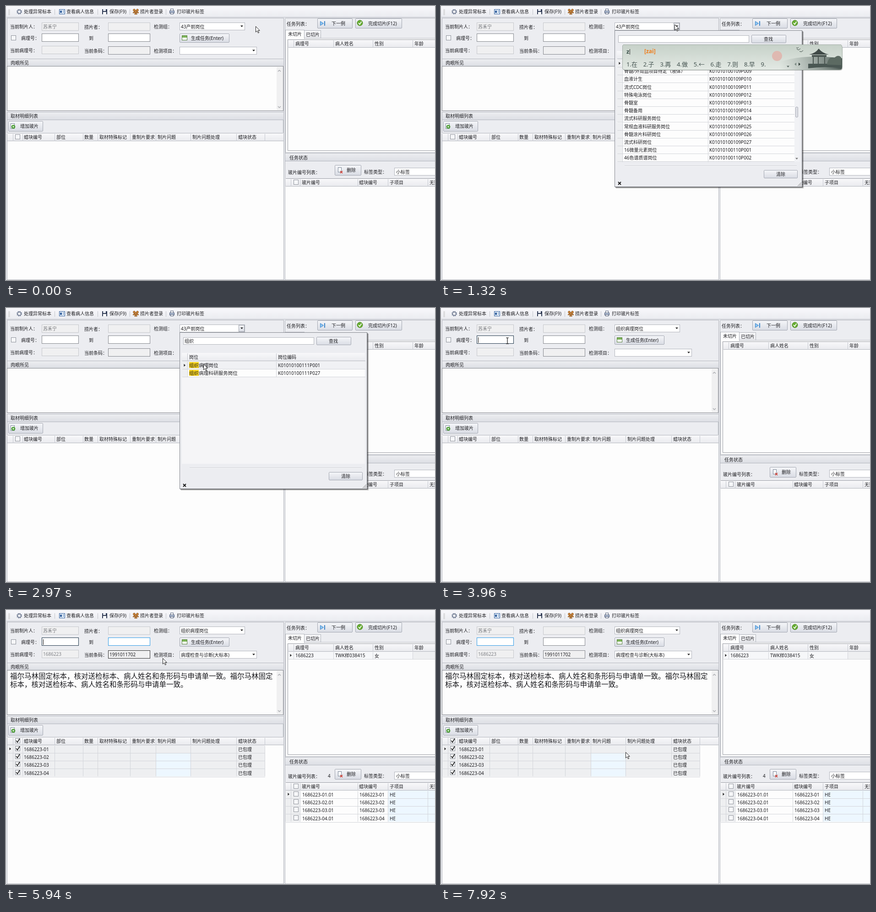
Recreate the animation shown at these times as an HTML page. Size 937 by 598 pixels, loop 8000 ms.

```html
<!DOCTYPE html>
<html lang="zh">
<head>
<meta charset="utf-8">
<style>
html, body { margin: 0; width: 100%; height: 100%; overflow: hidden; background: #ecedf1; }
svg { display: block; width: 100%; height: 100%; }
text { font-family: "Noto Sans", "Noto Sans CJK SC", "Noto Sans CJK", sans-serif; white-space: pre; }
rect, line { shape-rendering: crispEdges; }
</style>
</head>
<body>
<svg id="stage" viewBox="0 0 937 598" preserveAspectRatio="none"></svg>
<script>
const LOOP = 8000, STEP = 330;
const PANEL = '#ecedf1', WHITE = '#fdfdfd', EDGE = '#b3b6bd', GRID = '#d3d5da', DARK = '#85888e';
const HOT = '#2e9be6', SHADE = '#eeeff1', TINT = '#edf7ff';

const DEFS = `<defs>${[
  ['bar', '#f8f8fb', '#eaebf0'], ['title', '#edeef1', '#dcdee4'], ['head', '#f8f8fa', '#e9eaee'],
  ['btn', '#f5f6f9', '#d9dce4'], ['ime', '#c6d1c8', '#e3e9e4']
].map(([id, a, b]) => `<linearGradient id="${id}" x2="0" y2="1"><stop stop-color="${a}"/><stop offset="1" stop-color="${b}"/></linearGradient>`).join('')}
<linearGradient id="mist"><stop stop-color="#8c9a94" stop-opacity="0"/><stop offset="1" stop-color="#4d5a55"/></linearGradient></defs>`;

const fill = (x, y, w, h, color) => `<rect x="${x}" y="${y}" width="${w}" height="${h}" fill="${color}"/>`;
const box = (x, y, w, h, color, stroke = EDGE, r = 0) =>
  `<rect x="${x + .5}" y="${y + .5}" width="${w - 1}" height="${h - 1}" rx="${r}" fill="${color}" stroke="${stroke}"/>`;
const line = (x1, y1, x2, y2, color = GRID) =>
  `<line x1="${x1 + .5}" y1="${y1 + .5}" x2="${x2 + .5}" y2="${y2 + .5}" stroke="${color}"/>`;
const path = (d, color, stroke = 'none', width = 1) => `<path d="${d}" fill="${color}" stroke="${stroke}" stroke-width="${width}"/>`;
const dot = (x, y, r, color, stroke = 'none') => `<circle cx="${x}" cy="${y}" r="${r}" fill="${color}" stroke="${stroke}"/>`;
// y is the middle of the line of text
const text = (x, y, str, color = '#1b1b1f', size = 10, weight = 400) =>
  `<text x="${x}" y="${y + size * .37}" font-size="${size}" fill="${color}" font-weight="${weight}">${str}</text>`;
const down = (x, y, color = '#222') => path(`M${x - 3},${y - 1.5}h6l-3,3.5z`, color);
const right = (x, y) => path(`M${x - 1.5},${y - 3}v6l3.5,-3z`, '#222');
const button = (x, y, w, h, label, tx) =>
  box(x, y, w, h, 'url(#btn)', '#a3a7b1', 2) + text(tx, y + h / 2, label);
const check = (x, y, on) => box(x, y, 11, 11, '#f6f7f9', '#8f939b') +
  (on ? path(`M${x + 2},${y + 5}l3,3.5l5,-8`, 'none', '#222', 1.7) : '');
const header = (y, h, x0, x1, columns) => fill(x0, y, x1 - x0, h, 'url(#head)') +
  line(x0, y + h - 1, x1, y + h - 1, EDGE) +
  columns.map(([x, label, dx = 3]) => line(x, y, x, y + h - 1, '#c5c8cf') + text(x + dx, y + h / 2, label)).join('');
const rowY = (first, i) => first + Math.round(i * 17.2);

function toolbar() {
  const labels = [[39, '处理异常标本'], [132, '查看病人信息'], [226, '保存(F9)'], [293, '捞片者登录'], [373, '打印玻片标签']];
  let s = fill(0, 0, 937, 25, 'url(#bar)') + line(0, 24, 937, 24, '#b9bcc4') + line(6, 6, 6, 19, '#bbb') + line(8, 6, 8, 19, '#ddd');
  s += labels.map(([x, l]) => text(x, 12, l)).join('');
  s += [106, 200, 270, 349].map(x => line(x, 6, x, 18, '#c2c4ca')).join('');
  s += `<circle cx="29" cy="12.5" r="4.5" fill="none" stroke="#69758d" stroke-width="2.5" stroke-dasharray="2.2 1.3"/>` + dot(29, 12.5, 3.5, 'none', '#69758d');
  s += box(116, 7, 13, 11, '#eaf2fb', '#315f9d') + fill(118, 10, 4, 5, '#315f9d') + line(123, 10, 126, 10, '#315f9d') + line(123, 13, 126, 13, '#315f9d');
  s += fill(210, 7, 11, 11, '#303b55') + fill(212, 7, 6, 4, '#e4e8ef') + fill(212, 13, 7, 5, '#fff');
  s += [[280, 9], [287, 9], [283.5, 12]].map(([x, y]) => dot(x, y, 2.3, '#d58a3a', '#8b531b') + path(`M${x - 3},${y + 6}q3,-5 6,0z`, '#d58a3a', '#8b531b')).join('');
  return s + box(359, 6, 7, 6, '#fff', '#56627b') + box(357, 10, 11, 6, '#aebbd2', '#56627b') + box(359, 14, 7, 4, '#fff', '#56627b');
}

function form(t) {
  const loaded = t >= 5940, picked = t >= 3300;
  let s = box(2, 26, 605, 90, PANEL);
  const labels = [[9, 45, '当前制片人：'], [171, 46, '捞片者：'], [323, 45, '检测组：'], [33, 70, '病理号：'], [181, 70, '到'],
    [9, 97, '当前病理号：'], [171, 98, '当前条码：'], [323, 98, '检测项目：']];
  s += labels.map(([x, y, l]) => text(x, y, l)).join('') + check(11, 64);
  const off = '#f0f0f1', offEdge = '#c6c8cc';
  s += box(78, 36, 81, 18, off, offEdge) + text(81, 45, '苏禾宁', '#6c6e73');
  s += box(223, 36, 92, 18, off, offEdge) + box(78, 87, 81, 18, off, offEdge);

  const typing = t >= 4290 && t < 4620, second = t >= 4620 && t < 6270;
  const firstEdge = typing || t >= 6270 ? HOT : t >= 3960 && !(second && !loaded) ? '#22394d' : DARK;
  s += box(78, 60, 81, 18, '#fff', firstEdge);
  s += box(223, 60, 92, 18, '#fff', t >= 4950 && second ? HOT : second ? '#5d87a5' : DARK);
  s += box(223, 88, 92, 18, off, t >= 3630 && t < 3960 ? '#6c9cba' : loaded && t < 6270 ? '#333' : DARK);
  if (t >= 4290 && !loaded) s += text(81, 69, typing ? '1686' : '1686223');
  if (t >= 4950 && !loaded) s += text(226, 69, '1686223');
  const caret = t >= 3960 && t < 4290 || loaded && t < 6600 || t >= 7260 && t < 7920;
  if (caret) s += line(81, 63, 81, 75, '#111');

  s += box(379, 36, 143, 17, '#fff');
  const focused = picked && t < 3960;
  if (focused) s += fill(381, 37, 126, 14, '#3399ff');
  s += text(382, 45, picked ? '组织病理岗位' : '43产前岗位', focused ? '#fff' : undefined);
  if (t >= 330 && !picked) s += box(508, 37, 13, 15, 'url(#btn)', '#9da1aa');
  s += down(515, 44) + box(379, 89, 169, 17, '#fff') + down(541, 97);
  s += button(379, 60, 109, 20, '生成任务(Enter)', 404) + box(384, 64, 12, 11, '#fff', '#56803d') + fill(385, 65, 10, 4, '#7eb45a');
  if (loaded) s += text(81, 96, '1686223', '#808287') + text(226, 97, '1991011702') + text(382, 98, '病理检查与诊断(大标本)');
  return s;
}

function leftPanel(t) {
  const loaded = t >= 5940;
  let s = box(2, 115, 605, 17, 'url(#title)') + text(10, 124, '肉眼所见');
  s += box(2, 131, 604, 98, WHITE, t >= 6270 && t < 6600 ? HOT : DARK) + fill(591, 133, 13, 94, '#f0f0f1');
  s += path('M594,143l3,-3l3,3M594,219l3,3l3,-3', 'none', '#a0a2a6', 1.2);
  if (loaded) {
    const clause = '，核对送检标本、病人姓名和条形码与申请单一致。';
    const memo = (y, str) => text(9, y, str, '#16161a', 15.5, 300);
    s += memo(144, '福尔马林固定标本' + clause + '福尔马林固定') + memo(162.5, '标本' + clause);
  }
  s += box(2, 231, 605, 18, 'url(#title)') + text(10, 240, '取材明细列表') + box(2, 248, 604, 30, PANEL, EDGE, 2);
  s += button(5, 251, 76, 23, '增加玻片', 31) + box(10, 256, 9, 12, '#fff', '#7b8797') + dot(16, 263.5, 4.3, '#4d9e37') + path('M14,263.5h4M16,261.5v4', 'none', '#fff', 1.2);
  s += fill(2, 278, 604, 320, WHITE);
  const columns = [[15, ''], [36, '蜡块编号'], [106, '部位', 4], [168, '数量'], [200, '取材特殊标记', 4], [271, '重制片要求', 4],
    [327, '制片问题', 4], [403, '制片问题处理', 4], [503, '蜡块状态', 4], [565, '']];
  s += header(278, 17, 2, 606, columns) + check(20, 280, loaded);
  if (loaded) {
    s += fill(3, 295, 562, 68, SHADE) + fill(327, 312, 76, 51, TINT);
    for (let i = 0; i < 4; i++) {
      const y = rowY(304, i);
      s += check(20, y - 7, true) + text(39, y, '1686223-0' + (i + 1)) + text(507, y, '已包理') + line(3, y + 8, 565, y + 8);
    }
    s += columns.map(([x]) => line(x, 295, x, 362)).join('') + right(9, 303);
  }
  return s + line(2, 278, 2, 598, EDGE) + line(606, 26, 606, 598, EDGE) + line(2, 597, 606, 597, EDGE);
}

function rightPanel(t) {
  const loaded = t >= 5940;
  let s = fill(609, 26, 328, 572, PANEL) + line(609, 26, 609, 598, EDGE) + line(609, 26, 937, 26, EDGE) + text(613, 39, '任务列表：');
  s += button(680, 27, 77, 22, '下一例', 711) + path('M686.5,33.5l7,4.5l-7,4.5z', '#8cc4f2', '#3f86c8') + fill(695, 33, 2, 10, '#3f86c8');
  s += button(763, 27, 102, 22, '完成切片(F12)', 791) + dot(773, 37, 6, '#67ad32', '#4b8522') + path('M770,37l2.5,3l4,-6', 'none', '#fff', 1.7);
  s += box(610, 70, 330, 250, WHITE) + box(651, 53, 37, 18, 'url(#head)') + box(610, 52, 42, 20, WHITE, EDGE, 1) + fill(611, 70, 40, 3, WHITE);
  s += text(616, 61, '未切片') + text(655, 62, '已切片') + box(615, 73, 330, 243, WHITE, '#999ca3');
  const tasks = [[628, '病理号', 4], [715, '病人姓名', 4], [801, '性别', 4], [888, '年龄', 4]];
  s += header(74, 17, 616, 937, tasks);
  if (loaded) {
    s += fill(616, 91, 321, 16, '#f6f7f9') + fill(888, 91, 49, 16, SHADE) + line(616, 107, 937, 107);
    s += tasks.map(([x]) => line(x, 91, x, 107)).join('') + right(622, 99);
    s += text(632, 99, '1686223') + text(719, 99, 'TWK样038415') + text(805, 100, '女');
  }
  s += box(609, 321, 330, 18, 'url(#title)') + text(619, 331, '任务状态') + text(616, 363, '玻片编号列表：');
  s += button(718, 347, 58, 23, '删除', 744) + box(725, 352, 8, 11, '#fff', '#7b8797') + path('M730,360l5,5m0,-5l-5,5', 'none', '#d33c31', 1.7);
  s += text(782, 362, '标签类型：') + box(848, 353, 100, 17, '#fff') + text(852, 362, '小标签');
  s += fill(610, 376, 327, 222, WHITE) + line(610, 376, 937, 376, '#999ca3');
  const slides = [[622, ''], [642, '玻片编号', 4], [768, '蜡块编号'], [834, '子项目', 4], [921, '无签', 4]];
  s += header(377, 17, 610, 937, slides) + check(628, 379);
  if (loaded) {
    s += text(703, 362, '4') + fill(610, 394, 32, 68, SHADE) + fill(834, 394, 103, 68, TINT);
    for (let i = 0; i < 4; i++) {
      const y = rowY(403, i), id = '1686223-0' + (i + 1);
      s += check(628, y - 7) + text(647, y, id + '.01') + text(772, y, id) + text(838, y, 'HE') + line(610, y + 8, 937, y + 8);
    }
    s += slides.map(([x]) => line(x, 394, x, 461)).join('') + right(617, 402);
  }
  return s + line(609, 376, 609, 598, EDGE) + line(609, 597, 937, 597, EDGE);
}

const POSTS = [['43产前岗位', '109P008'], ['骨髓/外周血项目待定（液体）', '109P009'], ['血液计生', '109P010'], ['流式CDC岗位', '109P011'],
  ['特殊电泳岗位', '109P012'], ['骨髓室', '109P013'], ['骨髓备用', '109P014'], ['流式科研服务岗位', '109P024'],
  ['常规血液科研服务岗位', '109P025'], ['骨髓涂片科研岗位', '109P026'], ['流式科研岗位', '109P027'],
  ['16微量元素岗位', '110P001'], ['46色谱质谱岗位', '110P002']];
const MATCHES = [['病理岗位', '111P001'], ['病理科研服务岗位', '111P027']];

function popup(t) {
  const filtered = t >= 2310, rows = filtered ? MATCHES : POSTS;
  const split = filtered ? 590 : 583, end = filtered ? 784 : 771;
  let s = [3, 2, 1].map(d => `<rect x="${379 + d}" y="${53 + d}" width="410" height="342" fill="#000" opacity=".22"/>`).join('');
  s += box(379, 53, 410, 342, PANEL, '#85888f');
  s += box(387, 64, 286, 16, '#fff') + button(678, 63, 76, 18, '查找', 705);
  if (t >= 1980) s += text(390, 72, '组织');
  if (t >= 1980 && t < 2310) s += line(410, 66, 410, 77, '#111');
  s += fill(384, 98, 400, 242, filtered ? '#f5f5f7' : WHITE);
  s += header(98, 18, 384, 784, [[396, '岗位', 4], [split, '岗位编码', filtered ? 4 : 3], ...(filtered ? [] : [[771, '']])]);
  const focus = !filtered || t >= 2970;
  rows.forEach(([name, code], i) => {
    const y = rowY(125, i);
    s += fill(384, y - 8, 12, 16, SHADE) + fill(397, y - 8, end - 397, 16, i || !focus ? WHITE : '#f0f1f4') + line(384, y + 8, end, y + 8);
    if (filtered) s += fill(400, y - 7, 21, 13, '#ffd91c') + text(400, y, '组织' + name, undefined, 10.6);
    else s += text(400, y, name);
    s += text(split + (filtered ? 4 : 3), y, 'K01010100' + code);
  });
  const bottom = filtered ? 150 : 340;
  s += line(396, 116, 396, bottom) + line(split, 116, split, bottom);
  if (focus) s += right(390, 125);
  if (!filtered) s += fill(772, 116, 12, 224, '#f1f2f5') + box(774, 220, 6, 23, '#dfe1e7', '#a7abb4', 2) +
    path('M774,125.5h6l-3,-3z', '#777') + down(777, 333, '#777');
  if (t >= 2640 && t < 2970) s += box(580, 101, 7, 7, '#f7f8fb', '#8d9097') + down(583.5, 104.5);
  s += line(400, 348, 776, 348, '#cfd1d7') + line(400, 349, 776, 349, '#f8f8fa') + button(705, 358, 74, 18, '清除', 732);
  s += path('M387,384l6,6m0,-6l-6,6', 'none', '#111', 1.8) + path('M779,393l8,-8m-5,8l5,-5m-2,5l2,-2', 'none', '#888');
  return s;
}

function inputMethod(t) {
  const long = t >= 1650;
  let s = `<rect x="397" y="86" width="480" height="55" rx="5" fill="#000" opacity=".2"/>`;
  s += `<rect x="396" y="84" width="480" height="55" rx="5" fill="url(#ime)" stroke="#a3aea6"/>`;
  s += path('M740,139V122q50,-18 136,-8V134q0,5 -5,5z', 'url(#mist)');
  s += path('M804,106q14,-3 21,-13q8,10 22,13z', '#404a47') + path('M810,107h32v4h-32zM812,110h2v18h-2zM823,110h2v18h-2zM837,110h2v18h-2z', '#4a5551');
  s += path('M802,126h72v10q-36,-5 -72,0z', '#4a5753') + path('M843,128q3,-19 16,-15q9,-8 15,-1v17z', '#5c6a62');
  s += path('M777,94l4,2l4,-3M783,99l4,1l4,-3M776,91l3,1l2,-2', 'none', '#3d4946') + dot(734, 109, 11, '#dfb9b1');
  s += text(405, 99, long ? "zu'zhi" : 'z', '#3c514b', 13, 700);
  const caretX = long ? 446 : 412;
  s += line(caretX, 93, caretX, 105, '#333');
  if (!long) s += text(444, 99, '[zai]', '#ef7d1c', 12, 700);
  const words = long ? ['组织', '阻止', '组', '足', '族', '租', '祖'] : ['在', '子', '再', '做', '←', '走', '则', '早', ''];
  let x = 405;
  words.forEach((word, i) => {
    s += text(x, 127, `${i + 1}.${word}`, '#43524f', 13);
    x += 36.7 + (word.length > 1 ? 13 : 0);
  });
  return s + down(758, 132, '#5a6863') + path('M776,123.5v7l-4,-3.5z', '#7b8983') + path('M781,123.5v7l4,-3.5z', '#2f3d38');
}

// [start, x, y]; a start without a place hides the pointer
const POINTER = [[0, 545, 44], [330, 510, 40], [2640, 427, 112], [2970, 431, 122], [3300, 274, 105], [3630, 169, 71],
  [3960, 145, 71], [4290], [5940, 342, 105], [6270, 500, 150], [6600, 683, 191], [6930, 699, 183], [7260, 430, 275],
  [7590, 393, 281], [7920, 403, 310]];

function pointer(t) {
  const [start, x, y] = POINTER.filter(p => p[0] <= t).pop();
  if (x === undefined) return '';
  if (start === 3960) return path(`M${x - 3},${y - 6}h2.5l.5,1l.5,-1h2.5M${x},${y - 5}v11M${x - 3},${y + 7}h2.5l.5,-1l.5,1h2.5`, 'none', '#111', 1.2);
  return path(`M${x + .5},${y + .5}v12.5l3,-2.8l2.2,4.8l2,-1l-2.2,-4.5h3.8z`, '#fff', '#222');
}

const scene = t => DEFS + fill(0, 0, 937, 598, PANEL) + toolbar() + form(t) + leftPanel(t) + rightPanel(t) +
  (t >= 660 && t < 3300 ? popup(t) : '') + (t >= 1320 && t < 1980 ? inputMethod(t) : '') + pointer(t);

const stage = document.getElementById('stage'), begin = performance.now();
let shown = -1;
function tick() {
  const step = Math.floor((performance.now() - begin) % LOOP / STEP);
  if (step !== shown) stage.innerHTML = scene(step * STEP);
  shown = step;
  requestAnimationFrame(tick);
}
tick();
</script>
</body>
</html>
```
